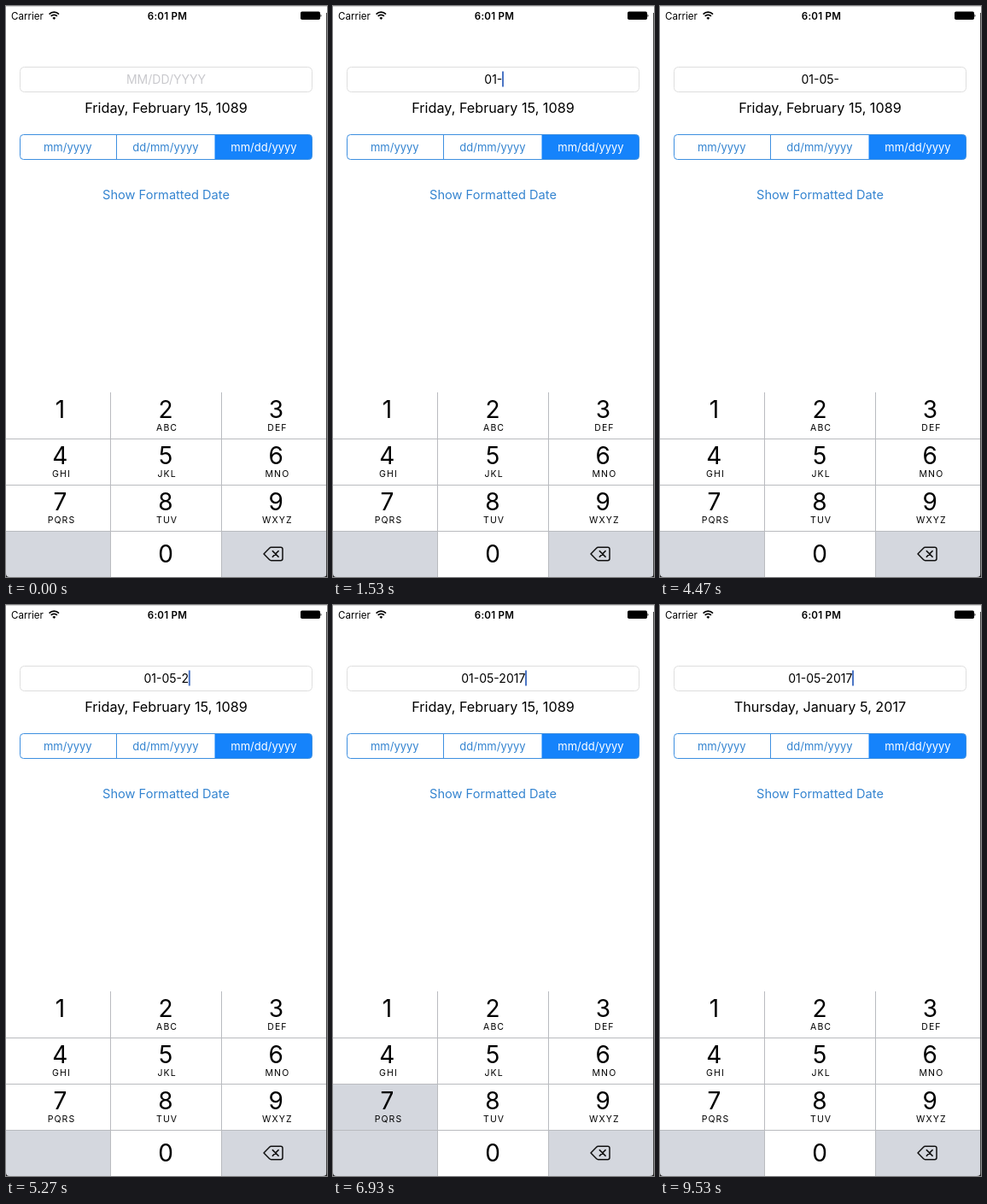
Recreate the animation shown at these times as an HTML page. Size 376 px wide and 668 px high, loop 9590 ms.

```html
<!DOCTYPE html>
<html lang="en">
<head>
<meta charset="utf-8">
<style>
  html, body { margin: 0; width: 100%; height: 100%; overflow: hidden; background: #fff; }
  svg { display: block; width: 376px; height: 668px; font-family: Inter, sans-serif; }
  text { text-anchor: middle; }
  .blue { fill: #3484d0; }
  .date { font-size: 16.2px; }
  .field { font-size: 14px; }
  .seg { font-size: 13px; }
  .digit { font-size: 28px; }
  .letters { font-size: 10.5px; letter-spacing: 1.1px; }
</style>
</head>
<body>
<svg viewBox="0 0 376 668">
  <rect width="376" height="668" fill="#fff"/>

  <!-- status bar -->
  <text x="6" y="15.5" font-size="11.6" style="text-anchor:start">Carrier</text>
  <g fill="none" stroke="#000" stroke-width="1.7">
    <path d="M50.6 9.6a8 8 0 0 1 11.4 0M52.7 11.9a5 5 0 0 1 7.2 0"/>
    <path d="M56.3 15.9l-1.9-2a2.7 2.7 0 0 1 3.8 0z" fill="#000" stroke="none"/>
  </g>
  <text x="189" y="15.5" font-size="11.6" font-weight="600" letter-spacing=".25">6:01 PM</text>
  <rect x="345" y="6.500" width="23" height="9.500" rx="1.8"/>
  <path d="M368.5 9.500q2 1.800 0 3.600z"/>

  <!-- date field and result -->
  <rect x="16.5" y="71.5" width="342" height="29" rx="5" fill="#fff" stroke="#dedede"/>
  <text id="hint" class="field" x="187.5" y="91" fill="#c9c9cd">MM/DD/YYYY</text>
  <text id="entry" class="field" x="187.8" y="91"></text>
  <rect id="caret" y="76.5" width="2" height="18" fill="#4a74c4"/>
  <text id="result" class="date" x="187.5" y="125"></text>

  <!-- format picker -->
  <path d="M244.5 150.5H354.5a4 4 0 0 1 4 4V175.5a4 4 0 0 1-4 4H244.5z" fill="#1583fb"/>
  <rect x="16.5" y="150.5" width="342" height="29" rx="4" fill="none" stroke="#3d8fe0"/>
  <path d="M129.5 151V179" stroke="#3d8fe0"/>
  <text class="seg blue" x="72.3" y="170">mm/yyyy</text>
  <text class="seg blue" x="187" y="170">dd/mm/yyyy</text>
  <text class="seg" x="302" y="170" fill="#fff">mm/dd/yyyy</text>
  <text id="show" class="blue" font-size="14.6" x="187.5" y="226">Show Formatted Date</text>

  <!-- keypad -->
  <g id="keys"></g>
  <path d="M0 506.5H375M0 560.5H375M0 614.5H375M122.5 452V668M252.5 452V668" stroke="#b9bbbf" fill="none"/>
  <g fill="none" stroke="#111" stroke-width="1.5" stroke-linejoin="round" stroke-linecap="round">
    <path d="M302 641l6.6-6.8q.9-.9 2-.9h11.2q2.2 0 2.2 2.2v11q0 2.2-2.2 2.2h-11.2q-1.1 0-2-.9z"/>
    <path d="M312.3 637.6l6.8 6.8m0-6.8l-6.8 6.8"/>
  </g>

  <!-- screen edge -->
  <path d="M0 .5H376" stroke="#d5d5d5"/>
  <path d="M375.5 8V668" stroke="#444"/>
  <path d="M0 664v4h4q-4 0-4-4zM376 663v5h-5q5 0 5-5z" fill="#222"/>
</svg>
<script>
const LOOP = 9590, PRESS = 130, TAP = 8450, SHOWN = 8580;
// time, key pressed, text afterwards
const typing = [
  [600, 0, '0'], [1200, 1, '01-'], [2600, 0, '01-0'], [3650, 5, '01-05-'],
  [4750, 2, '01-05-2'], [5450, 0, '01-05-20'], [6065, 1, '01-05-201'], [6850, 7, '01-05-2017'],
];
const letters = ['', '', 'ABC', 'DEF', 'GHI', 'JKL', 'MNO', 'PQRS', 'TUV', 'WXYZ'];
const columns = [[0, 122.5, 63.4], [122.5, 130, 187], [252.5, 122.5, 316.3]];
const GREY = '#d4d7de';
const $ = id => document.getElementById(id);
const clamp = x => Math.max(0, Math.min(1, x));

function add(tag, attrs, content = '') {
  const el = document.createElementNS('http://www.w3.org/2000/svg', tag);
  for (const name in attrs) el.setAttribute(name, attrs[name]);
  el.textContent = content;
  return $('keys').appendChild(el);
}

const keys = [];
for (let i = 0; i < 12; i++) {
  const [x, width, center] = columns[i % 3], y = 452 + 54 * Math.floor(i / 3);
  const digit = i < 9 ? i + 1 : i === 10 ? 0 : null;
  const back = add('rect', { x, y, width, height: 54, fill: digit === null ? GREY : '#fff' });
  if (digit === null) continue;
  keys[digit] = back;
  add('text', { class: 'digit', x: center, y: y + (digit ? 30 : 37) }, digit);
  add('text', { class: 'letters', x: center + 1.6, y: y + 45 }, letters[digit]);
}

function setText(id, value) {
  if ($(id).textContent !== value) $(id).textContent = value;
}

// Caret stays solid after a keystroke, then blinks once a second
function caretOpacity(since) {
  const phase = since % 1000;
  return clamp((800 - phase) / 100) + clamp((phase - 900) / 100);
}

function draw(t) {
  const [at, key, text] = typing.filter(k => k[0] <= t).pop() || [-800, null, ''];
  setText('entry', text);
  $('hint').style.visibility = text ? 'hidden' : 'visible';
  keys.forEach((el, digit) =>
    el.setAttribute('fill', digit === key && t - at < PRESS ? GREY : '#fff'));

  $('caret').setAttribute('x', 187.5 + (text ? $('entry').getComputedTextLength() / 2 : 0));
  $('caret').setAttribute('opacity', caretOpacity(t - at));

  setText('result', t < SHOWN ? 'Friday, February 15, 1089' : 'Thursday, January 5, 2017');
  $('show').setAttribute('opacity', t < TAP ? 1 : 0.2 + 0.8 * clamp((t - SHOWN) / 250));
}

const start = performance.now();
function tick() {
  draw((performance.now() - start) % LOOP);
  requestAnimationFrame(tick);
}
draw(0);
tick();
</script>
</body>
</html>
```
